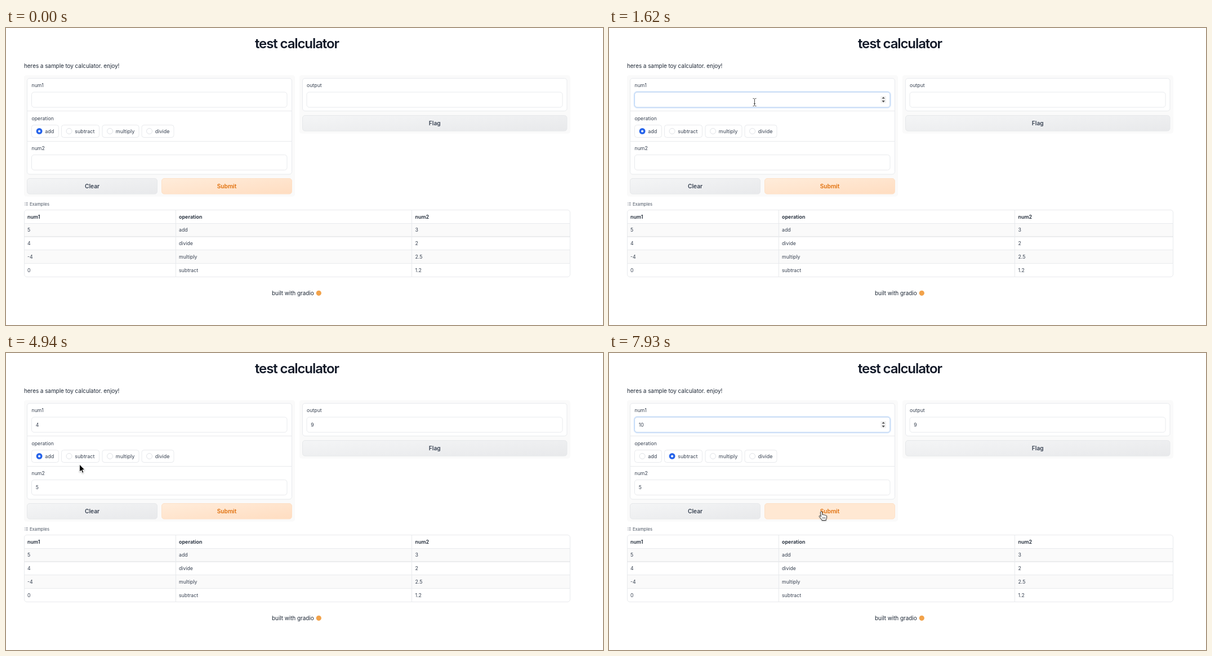
Write an HTML page that moves like this. It is 1060 px wide and 528 px high and loops after 8000 ms.

```html
<!DOCTYPE html>
<html lang="en">
<head>
<meta charset="utf-8">
<title>test calculator</title>
<style>
html, body { margin: 0; width: 100%; height: 100%; overflow: hidden; background: #fff; }
svg { display: block; font-family: Inter, "Open Sans", sans-serif; }
text { font-size: 8.75px; fill: #374151; white-space: pre; }
.title { font-size: 24px; font-weight: 600; fill: #111827; letter-spacing: -.046em; }
.body { font-size: 10px; fill: #1f2937; letter-spacing: -.007em; }
.btn { font-size: 10.2px; font-weight: 600; }
.th { font-size: 9px; font-weight: 600; fill: #1f2937; }
.chip { font-size: 9px; }
.small { font-size: 7.7px; fill: #4b5563; }
</style>
</head>
<body>
<svg id="stage" width="1060" height="528" viewBox="0 0 1060 528">
  <defs>
    <linearGradient id="gray" x2="1" y2="1"><stop stop-color="#f4f5f6"/><stop offset="1" stop-color="#e8e9eb"/></linearGradient>
    <linearGradient id="peach" x2="1" y2="1"><stop stop-color="#ffecda"/><stop offset="1" stop-color="#ffddc1"/></linearGradient>
    <filter id="shade" x="-50%" y="-50%" width="200%" height="200%">
      <feDropShadow dx="0" dy="1" stdDeviation=".8" flood-opacity=".3"/>
    </filter>
  </defs>
</svg>
<script>
const stage = document.getElementById('stage');
const LINE = '#e8eaed';
const PANEL = '#fafafa';
const LOOP = 8000;

function add(tag, attrs, parent = stage) {
  const el = document.createElementNS(stage.namespaceURI, tag);
  for (const k in attrs) el.setAttribute(k, attrs[k]);
  return parent.appendChild(el);
}
function box(x, y, r, b, fill, stroke = 'none', rx = 4.5) {
  return add('rect', { x, y, width: r - x, height: b - y, rx, fill, stroke });
}
function line(x1, y1, x2, y2, stroke = LINE) {
  return add('line', { x1, y1, x2, y2, stroke });
}
function label(str, x, y, cls = '', anchor = 'start') {
  const el = add('text', { x, y, class: cls, 'text-anchor': anchor });
  el.textContent = str;
  return el;
}
function button(str, x, y, r, fill, stroke, color) {
  const rect = box(x, y, r, y + 27.5, fill, stroke);
  label(str, (x + r) / 2, y + 17.6, 'btn', 'middle').style.fill = color;
  return rect;
}
function field(x, y, r) {
  const glow = box(x - .5, y - .5, r + .5, y + 27.5, 'none', '#dfecfd', 5);
  glow.setAttribute('stroke-width', 3);
  const edge = box(x, y, r, y + 27, '#fff', LINE);
  const blue = box(x, y, r, y + 27, 'none', '#b4d2f7');
  const value = label('', x + 7.2, y + 16.8);
  const spin = add('g', { transform: `translate(487.2 ${y + 13.3})` });
  add('rect', { x: -4.8, y: -6.2, width: 9.6, height: 12.4, rx: 1, fill: '#f1f1f1' }, spin);
  add('path', { d: 'M-2.7-1.7L0-4.9L2.7-1.7ZM-2.7 1.7L0 4.9L2.7 1.7Z', fill: '#505050' }, spin);
  return { x, y, r, edge, glow, blue, value, spin };
}

// Header and panels
label('test calculator', 516.4, 35.5, 'title', 'middle');
label('heres a sample toy calculator. enjoy!', 32, 71, 'body');
box(32, 84, 513, 299.5, PANEL);
box(521, 84, 1002, 187.5, PANEL);
box(37.5, 89.5, 507.5, 260, '#fff', LINE);
box(526.5, 89.5, 996, 147.5, '#fff', LINE);
line(37.5, 147.5, 507.5, 147.5);
line(37.5, 201.5, 507.5, 201.5);
label('num1', 45.5, 105.3);
label('operation', 45.5, 164.3);
label('num2', 45.5, 217.3);
label('output', 534, 105.3);

const inputs = [field(45.5, 114, 499), field(45.5, 225.5, 499)];
const output = field(534, 114, 988);
output.glow.style.display = output.blue.style.display = output.spin.style.display = 'none';

// Radio choices: name, chip left, chip right
const chips = [['add', 45.5, 93.5], ['subtract', 98.5, 165.5], ['multiply', 171, 236], ['divide', 241, 298]]
  .map(([name, x, r]) => {
    box(x, 172.5, r, 194.5, '#fff', LINE, 4);
    label(name, x + 23.8, 186.6, 'chip');
    const cx = x + 13.6, cy = 183.4;
    add('circle', { cx, cy, r: 5, fill: '#fff', stroke: '#dfe2e6' });
    const on = add('g', {});
    add('circle', { cx, cy, r: 5.4, fill: '#2563eb' }, on);
    add('circle', { cx, cy, r: 2, fill: '#fff' }, on);
    return { x, r, on };
  });

button('Flag', 526.5, 155.5, 996, 'url(#gray)', '#e6e8ea', '#374151');
button('Clear', 37.5, 267.5, 268.5, 'url(#gray)', '#e6e8ea', '#374151');
const submit = button('Submit', 276.5, 267.5, 507.5, 'url(#peach)', '#fee0c6', '#e1700c');

// Examples table
for (const y of [310.5, 312.8, 315.1]) {
  line(33, y, 34, y, '#6b7280').setAttribute('stroke-width', .7);
  line(35, y, 39, y, '#6b7280').setAttribute('stroke-width', .7);
}
label('Examples', 42, 315.5, 'small');
box(33, 347.5, 1001, 371, PANEL, 'none', 0);
box(33, 394.5, 1001, 418.5, PANEL, 'none', 0);
box(32.5, 323.5, 1001.5, 442.5, 'none', LINE);
for (const y of [347.5, 394.5, 418.5]) line(32.5, y, 1001.5, y);
line(32.5, 371, 1001.5, 371, '#d9dbdf');
for (const x of [301.5, 720.5]) line(x, 323.5, x, 442.5);
[['num1', 'operation', 'num2'], ['5', 'add', '3'], ['4', 'divide', '2'],
 ['-4', 'multiply', '2.5'], ['0', 'subtract', '1.2']].forEach((row, i) =>
  row.forEach((s, j) => label(s, [38, 307, 726.5][j], 338.6 + i * 23.8, i ? '' : 'th')));
label('built with gradio', 472, 474.8, 'body');
add('circle', { cx: 555.3, cy: 471.3, r: 4.6, fill: '#f2a24a' });

// Caret and pointers
const caret = add('rect', { width: .9, height: 10.5, fill: '#111' });
const pointer = add('g', {});
const shapes = {
  arrow: add('path', {
    d: 'M0 0V13.4L3.1 10.6L5.2 15.4L7.5 14.4L5.4 9.8H9.6Z',
    fill: '#000', stroke: '#fff', 'stroke-width': 1, filter: 'url(#shade)'
  }, pointer),
  beam: add('path', {
    d: 'M-3-6.8Q-.4-6.8 0-5.6Q.4-6.8 3-6.8M-3 6.8Q-.4 6.8 0 5.6Q.4 6.8 3 6.8M0-5.6V5.6M-1.6 2.6H1.6',
    fill: 'none', stroke: '#444', 'stroke-width': 1
  }, pointer),
  hand: add('g', { filter: 'url(#shade)' }, pointer)
};
add('path', {
  d: 'M-1.5 1.2C-1.5-.6 1.3-.6 1.5 1L2 6C2.2 5 4.4 5 4.6 6.3C5 5.5 6.9 5.7 7.1 6.9C7.6 6.2 9.6 6.6 9.6 8.2L9.3 11.5L8.3 13.6V15.5H1L.8 14.2C-1 12.6-2 10.4-3.6 8.6C-4.3 7.6-2.8 6.8-1.8 7.8L-.6 9Z',
  fill: '#fff', stroke: '#222', 'stroke-width': .9, 'stroke-linejoin': 'round'
}, shapes.hand);
add('path', { d: 'M2.4 9.5V12.8M4.4 9.5V12.8M6.4 9.5V12.8', stroke: '#333', 'stroke-width': .7 }, shapes.hand);

// Moves: first step, last step, step count, end point
const moves = [
  [90, 90, 1, 860, 270], [170, 170, 1, 842, 266], [250, 560, 5, 499, 179],
  [720, 960, 4, 258.5, 132], [2110, 2420, 5, 263.5, 248],
  [3810, 4050, 4, 383, 288], [4780, 4940, 3, 130.5, 198],
  [5180, 5340, 3, 127, 185], [5660, 5820, 3, 380.5, 280],
  [6310, 6550, 4, 262, 130], [7700, 7930, 4, 377, 282]
];
// Each state holds from its time on
const num1 = [[0, ''], [1940, '4'], [7120, ''], [7280, '1'], [7450, '10']];
const num2 = [[0, ''], [3240, '5']];
const result = [[0, ''], [4290, '9']];
const focus = [[0, -1], [960, 0], [2420, 1], [4210, -1], [6550, 0]];
const choice = [[0, 0], [5500, 1]];
const blink = [[0, 0], [1120, 1], [1620, 0], [1940, 1], [2420, 0], [2580, 1], [3080, 0],
  [3240, 1], [3810, 0], [6630, 1], [7780, 0]];

const entry = (list, t) => list.filter(e => e[0] <= t).pop();
const at = (list, t) => entry(list, t)[1];
const show = (el, on) => { el.style.display = on ? '' : 'none'; };
const inside = (x, y, l, t, r, b) => x >= l && x <= r && y >= t && y <= b;

function position(t) {
  let x = 860, y = 270;
  for (const [start, end, n, tx, ty] of moves) {
    if (t < start) break;
    const gap = n > 1 ? (end - start) / (n - 1) : 1;
    const p = Math.min(1, (Math.floor((t - start) / gap + 1e-6) + 1) / n);
    const e = p * p * (3 - 2 * p);
    x += (tx - x) * e;
    y += (ty - y) * e;
  }
  return [x, y];
}

function render(t) {
  const [x, y] = position(t);
  const over = inputs.findIndex(f => inside(x, y, f.x, f.y, f.r, f.y + 27));
  const onSubmit = t >= 90 && inside(x, y, 276, 267, 508, 295);
  const onHand = onSubmit || inside(x, y, 37, 267, 269, 295) ||
    chips.some(c => inside(x, y, c.x, 172, c.r, 195));
  const kind = over >= 0 ? 'beam' : onHand ? 'hand' : 'arrow';
  for (const k in shapes) show(shapes[k], k === kind);
  show(pointer, t >= 90);
  pointer.setAttribute('transform', `translate(${x.toFixed(2)} ${y.toFixed(2)})`);
  submit.setAttribute('fill', onSubmit ? '#ffe8d3' : 'url(#peach)');

  const [since, active] = entry(focus, t);
  const fade = Math.min(1, (Math.floor((t - since) / 80) + 1) / 3);
  const values = [at(num1, t), at(num2, t)];
  inputs.forEach((f, i) => {
    f.value.textContent = values[i];
    const a = i === active ? fade : 0;
    f.glow.style.opacity = f.blue.style.opacity = a;
    show(f.spin, i === active || i === over);
  });
  output.value.textContent = at(result, t);
  chips.forEach((c, i) => show(c.on, i === at(choice, t)));

  const lit = active >= 0 && at(blink, t);
  show(caret, lit);
  if (lit) {
    const f = inputs[active];
    const w = values[active] ? f.value.getComputedTextLength() : 0;
    caret.setAttribute('x', f.x + 7.2 + w);
    caret.setAttribute('y', f.y + 8.4);
  }
}

const began = performance.now();
function tick() {
  render((performance.now() - began) % LOOP);
  requestAnimationFrame(tick);
}
tick();
</script>
</body>
</html>
```
